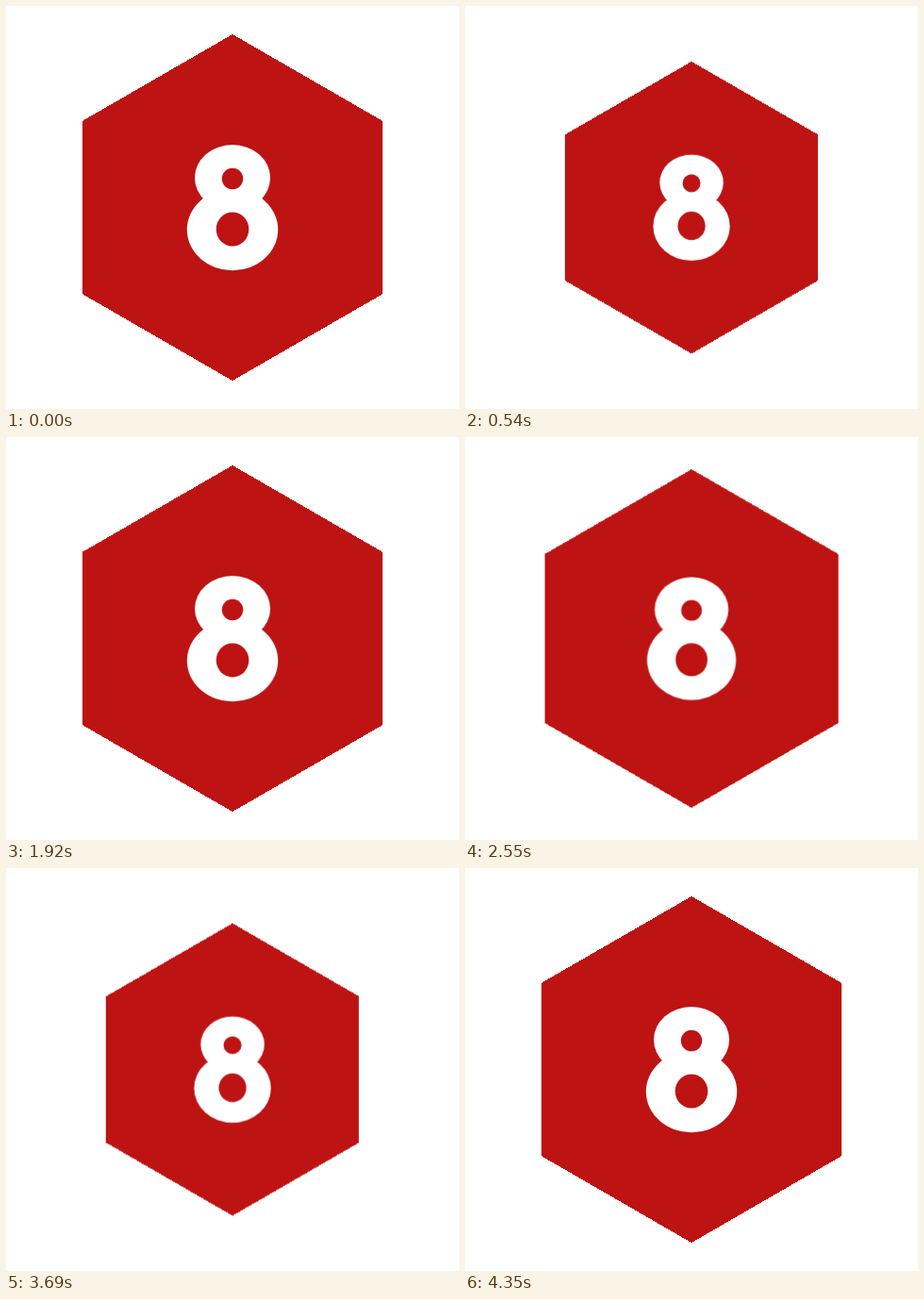
An HTML page for the animation above (4530 ms loop, 480 px wide and 427 px high).

```html
<!DOCTYPE html>
<html lang="en">
<head>
<meta charset="utf-8">
<title>Pulsing hexagon</title>
<style>
  html, body {
    margin: 0;
    width: 100%;
    height: 100%;
    overflow: hidden;
    background: #fff;
  }
  svg {
    display: block;
    width: 100%;
    height: 100%;
  }
  .badge {
    fill: #be1313;
    transform-origin: 240px 213.5px;
    animation: pulse 4530ms cubic-bezier(.667, 0, .333, 1) infinite;
  }
  .digit { fill: #fff; }

  /* two pulses of different tempo, resting at each end */
  @keyframes pulse {
    0% { transform: scale(1); }
    13.245%, 23.179% { transform: scale(.842); }
    43.046%, 49.669% { transform: scale(1); }
    69.536%, 79.47% { transform: scale(.842); }
    96.026%, 100% { transform: scale(1); }
  }
</style>
</head>
<body>
<svg viewBox="0 0 480 427" role="img" aria-label="8">
  <g class="badge">
    <polygon points="240,30 399,121.8 399,305.2 240,397 81,305.2 81,121.8" shape-rendering="crispEdges"/>
    <g class="digit">
      <ellipse cx="240" cy="182" rx="40" ry="35"/>
      <ellipse cx="240" cy="237" rx="48.2" ry="43.2"/>
    </g>
    <circle cx="240" cy="183" r="11.2"/>
    <ellipse cx="240" cy="236.5" rx="17.3" ry="18"/>
  </g>
</svg>
</body>
</html>
```
